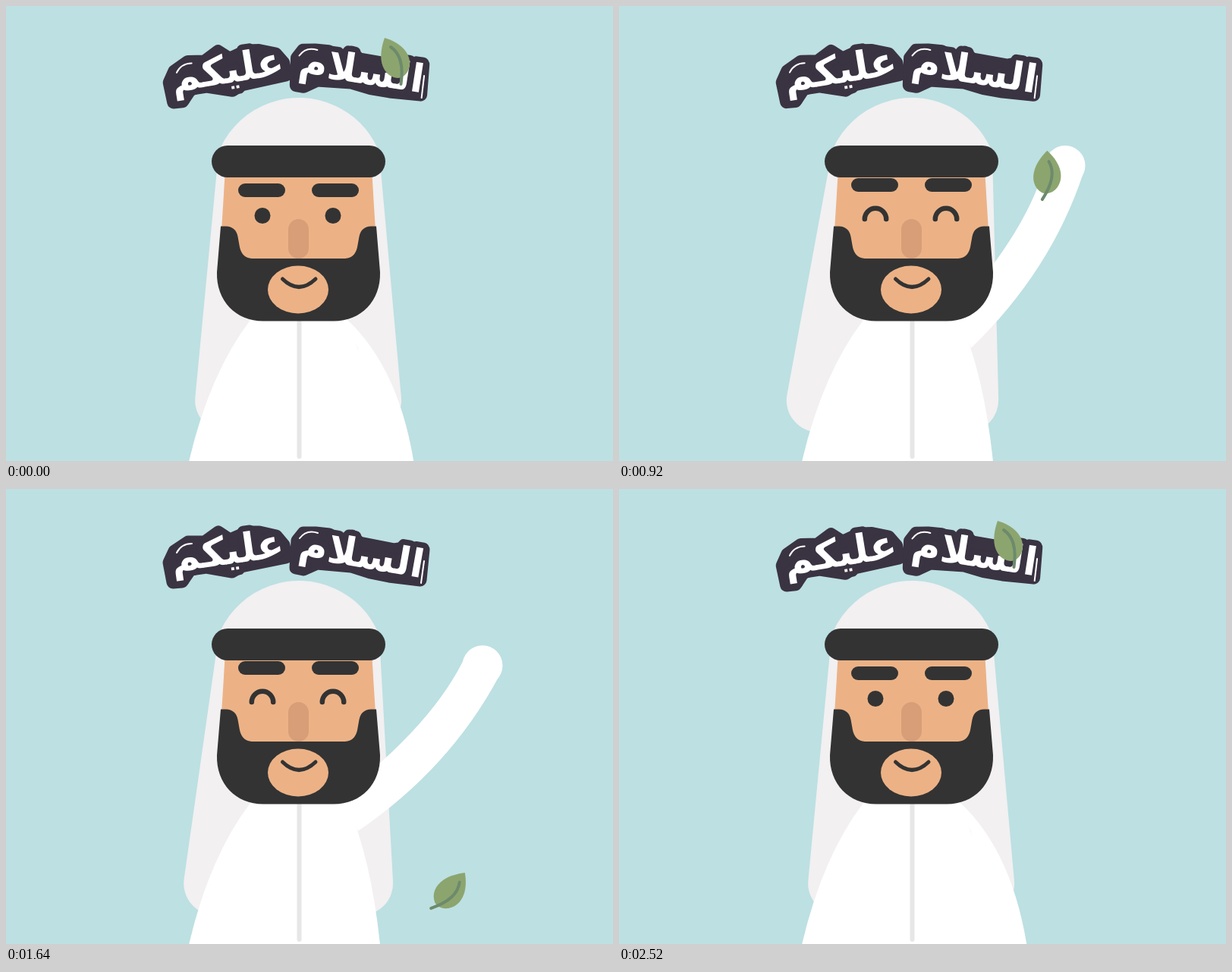
Write an HTML page with a canvas that moves like this. It is 800x600 px and loops after 2560 ms.

```html
<!DOCTYPE html>
<html lang="ar">
<head>
<meta charset="utf-8">
<title>Greeting</title>
<style>
  html, body { margin: 0; width: 100%; height: 100%; overflow: hidden; background: #bde0e2; }
  canvas { display: block; width: 800px; height: 600px; }
</style>
</head>
<body>
<canvas id="stage" width="800" height="600"></canvas>
<script>
const ctx = document.getElementById('stage').getContext('2d');
const LOOP = 2560, RESET = 2520, STEP = 40, WAVE = 480;
const COLOR = {
  sky: '#bde0e2', scarf: '#f2f0f1', dark: '#333333', skin: '#ecb286', nose: '#d79e78',
  robe: '#ffffff', seam: '#e8e7e8', ink: '#3a3342', leaf: '#8ca56f', vein: '#6d8a6c'
};
const rad = deg => deg * Math.PI / 180;
const lerp = (a, b, k) => a + (b - a) * k;
const ease = (from, to, t) => {
  const k = Math.min(1, Math.max(0, (t - from) / (to - from)));
  return k * k * (3 - 2 * k);
};
const swing = t => Math.cos(2 * Math.PI * t / WAVE);

function fill(color, build) {
  ctx.beginPath();
  build();
  ctx.fillStyle = color;
  ctx.fill();
}

function line(color, width, build) {
  ctx.beginPath();
  build();
  ctx.strokeStyle = color;
  ctx.lineWidth = width;
  ctx.stroke();
}

function pill(color, x, y, w, h) {
  fill(color, () => ctx.roundRect(x, y, w, h, Math.min(w, h) / 2));
}

// Sway of the cloth: alternating rest and peak times joined by cosine easing.
const swayTimes = [0, 345, 745, 1120, 1450, 2040, 2552];
function sway(t) {
  let i = 0;
  while (i < swayTimes.length - 2 && t >= swayTimes[i + 1]) i++;
  const k = (t - swayTimes[i]) / (swayTimes[i + 1] - swayTimes[i]);
  const rise = (1 - Math.cos(Math.PI * k)) / 2;
  return 64 * (i % 2 ? 1 - rise : rise);
}

function drawScarf(t) {
  const offset = sway(t);
  const left = 245 - 1.14 * offset, right = 525 - 0.83 * offset;
  fill(COLOR.scarf, () => {
    ctx.moveTo(280, 195);
    ctx.lineTo(492, 195);
    ctx.arcTo(right, 562, left, 562, 42);
    ctx.arcTo(left, 562, 280, 195, 42);
    ctx.closePath();
  });
  fill(COLOR.scarf, () => ctx.arc(386, 235, 114, rad(205), rad(335)));
}

function drawBody() {
  fill(COLOR.robe, () => {
    ctx.moveTo(322, 414);
    ctx.quadraticCurveTo(268, 485, 241, 601);
    ctx.lineTo(493, 601);
    ctx.quadraticCurveTo(481, 485, 449, 414);
  });
}

function drawArm(t) {
  const lift = ease(0, 250, t);
  const angle = rad(lerp(82, -60.8 - 6.1 * swing(t), lift));
  const length = lerp(223, 249, ease(200, 280, t));
  const ux = Math.cos(angle), uy = Math.sin(angle), nx = -uy, ny = ux;
  const tip = { x: 487 + length * ux, y: 438 + length * uy };
  const edge = side => ({ x: tip.x + 26 * side * nx, y: tip.y + 26 * side * ny });
  const control = (a, b, across, along) => [
    (a.x + b.x) / 2 + across * nx + along * ux,
    (a.y + b.y) / 2 + across * ny + along * uy
  ];
  const top = { x: 440, y: 405 }, bottom = { x: 464, y: 451 };
  const upper = edge(-1), lower = edge(1);
  fill(COLOR.robe, () => {
    ctx.moveTo(top.x, top.y);
    ctx.quadraticCurveTo(...control(top, upper, lerp(-45, 33, lift), lerp(-44, 25, lift)), upper.x, upper.y);
    ctx.lineTo(lower.x, lower.y);
    ctx.quadraticCurveTo(...control(bottom, lower, lerp(0, 34, lift), 0), bottom.x, bottom.y);
    ctx.closePath();
  });
  fill(COLOR.robe, () => ctx.arc(tip.x, tip.y, 26.5, 0, 2 * Math.PI));
}

function drawHead(t) {
  fill(COLOR.skin, () => {
    ctx.moveTo(289, 215);
    ctx.lineTo(482, 215);
    ctx.lineTo(490, 345);
    ctx.lineTo(281, 345);
  });
  fill(COLOR.dark, () => {
    ctx.moveTo(283, 290.5);
    ctx.lineTo(290, 290.5);
    ctx.quadraticCurveTo(303, 291, 305.5, 304);
    ctx.lineTo(308, 318);
    ctx.quadraticCurveTo(311, 332, 324, 333);
    ctx.lineTo(447, 333);
    ctx.quadraticCurveTo(460, 332, 463, 318);
    ctx.lineTo(465.5, 304);
    ctx.quadraticCurveTo(468, 291, 481, 290.5);
    ctx.lineTo(488, 290.5);
    ctx.lineTo(493, 351);
    ctx.bezierCurveTo(494, 389, 468, 415.5, 432, 415.5);
    ctx.lineTo(339, 415.5);
    ctx.bezierCurveTo(303, 415.5, 277, 389, 278, 351);
    ctx.closePath();
  });
  pill(COLOR.dark, 271, 184, 229, 42);
  pill(COLOR.nose, 372, 281, 27, 52);
  fill(COLOR.skin, () => ctx.ellipse(385, 374, 40, 31.5, 0, 0, 2 * Math.PI));
  line(COLOR.dark, 5, () => {
    ctx.moveTo(364.5, 360);
    ctx.quadraticCurveTo(386, 381, 408, 360);
  });

  const browY = lerp(234, 227, ease(320, 440, t));
  for (const x of [306, 403]) pill(COLOR.dark, x, browY, 62, 18);
  for (const x of [338, 431]) {
    if (t < 400) fill(COLOR.dark, () => ctx.arc(x, 276.5, 10.5, 0, 2 * Math.PI));
    else line(COLOR.dark, 6.5, () => ctx.arc(x, 281, 14.2, Math.PI, 2 * Math.PI));
  }
}

const plates = [
  [[215, 97], [222, 82], [240, 70], [262, 70], [280, 57], [295, 67], [318, 57], [334, 57],
   [356, 62], [366, 74], [369, 90], [310, 102], [298, 109], [264, 103], [243, 106], [232, 122], [220, 123]],
  [[384, 68], [392, 58], [408, 58], [426, 60], [440, 69], [456, 62], [466, 71], [512, 80],
   [530, 77], [550, 80], [546, 120], [505, 115], [480, 110], [455, 102], [410, 98], [392, 106], [382, 104]]
];

function drawWord(text, x, y, tilt, width) {
  const family = '"DejaVu Sans", sans-serif';
  ctx.font = `bold 100px ${family}`;
  const size = 100 * width / ctx.measureText(text).width;
  ctx.font = `bold ${size}px ${family}`;
  ctx.save();
  ctx.translate(x, y);
  ctx.rotate(rad(tilt));
  ctx.strokeStyle = COLOR.ink;
  ctx.lineWidth = 15;
  ctx.strokeText(text, 0, 0);
  ctx.fillStyle = '#fff';
  ctx.fillText(text, 0, 0);
  ctx.restore();
}

function drawGreeting(t) {
  ctx.save();
  ctx.translate(409, 90);
  ctx.rotate(rad(-0.64 * (swing(t) + 0.87)));
  ctx.translate(-409, -90);
  for (const plate of plates) {
    const outline = () => {
      plate.forEach(([x, y]) => ctx.lineTo(x, y));
      ctx.closePath();
    };
    fill(COLOR.ink, outline);
    line(COLOR.ink, 17, outline);
  }
  drawWord('عليكم', 294, 99, -8, 150);
  drawWord('السلام', 466, 103, 10, 166);
  line('#fff', 2, () => {
    ctx.moveTo(225, 84);
    ctx.quadraticCurveTo(231, 72, 245, 72);
    ctx.moveTo(387, 65);
    ctx.quadraticCurveTo(396, 53, 411, 58);
    ctx.moveTo(551, 95);
    ctx.lineTo(547, 124);
  });
  ctx.restore();
}

function drawLeaf(t) {
  const s = Math.max(0, t - 440);
  ctx.save();
  ctx.translate(
    513 + 0.1 * s - 9.2e-8 * s * (s - 160) * (s - 800),
    69 + 0.272 * s + 0.000094 * s * s
  );
  ctx.rotate(rad(0.0525 * s));
  fill(COLOR.leaf, () => {
    ctx.moveTo(-14, -27);
    ctx.bezierCurveTo(6, -21, 20, -8, 19, 8);
    ctx.bezierCurveTo(18, 20, 10, 26, 3, 26);
    ctx.bezierCurveTo(-9, 25, -17, 15, -18.5, 2);
    ctx.bezierCurveTo(-19.5, -8, -17, -19, -14, -27);
  });
  line(COLOR.vein, 4, () => {
    ctx.moveTo(-6, -15);
    ctx.bezierCurveTo(6, -7, 11, 10, 7.5, 34);
  });
  ctx.restore();
}

function draw(t) {
  ctx.fillStyle = COLOR.sky;
  ctx.fillRect(0, 0, 800, 600);
  drawScarf(t);
  drawBody();
  drawArm(t);
  line(COLOR.seam, 6, () => {
    ctx.moveTo(386.5, 410);
    ctx.lineTo(386.5, 594);
  });
  drawHead(t);
  drawGreeting(t);
  drawLeaf(t);
}

ctx.lineCap = ctx.lineJoin = 'round';
ctx.textAlign = 'center';
ctx.direction = 'rtl';

const start = performance.now();
function tick() {
  const t = Math.floor((performance.now() - start) % LOOP / STEP) * STEP;
  draw(t < RESET ? t : 0);
  requestAnimationFrame(tick);
}
tick();
</script>
</body>
</html>
```
